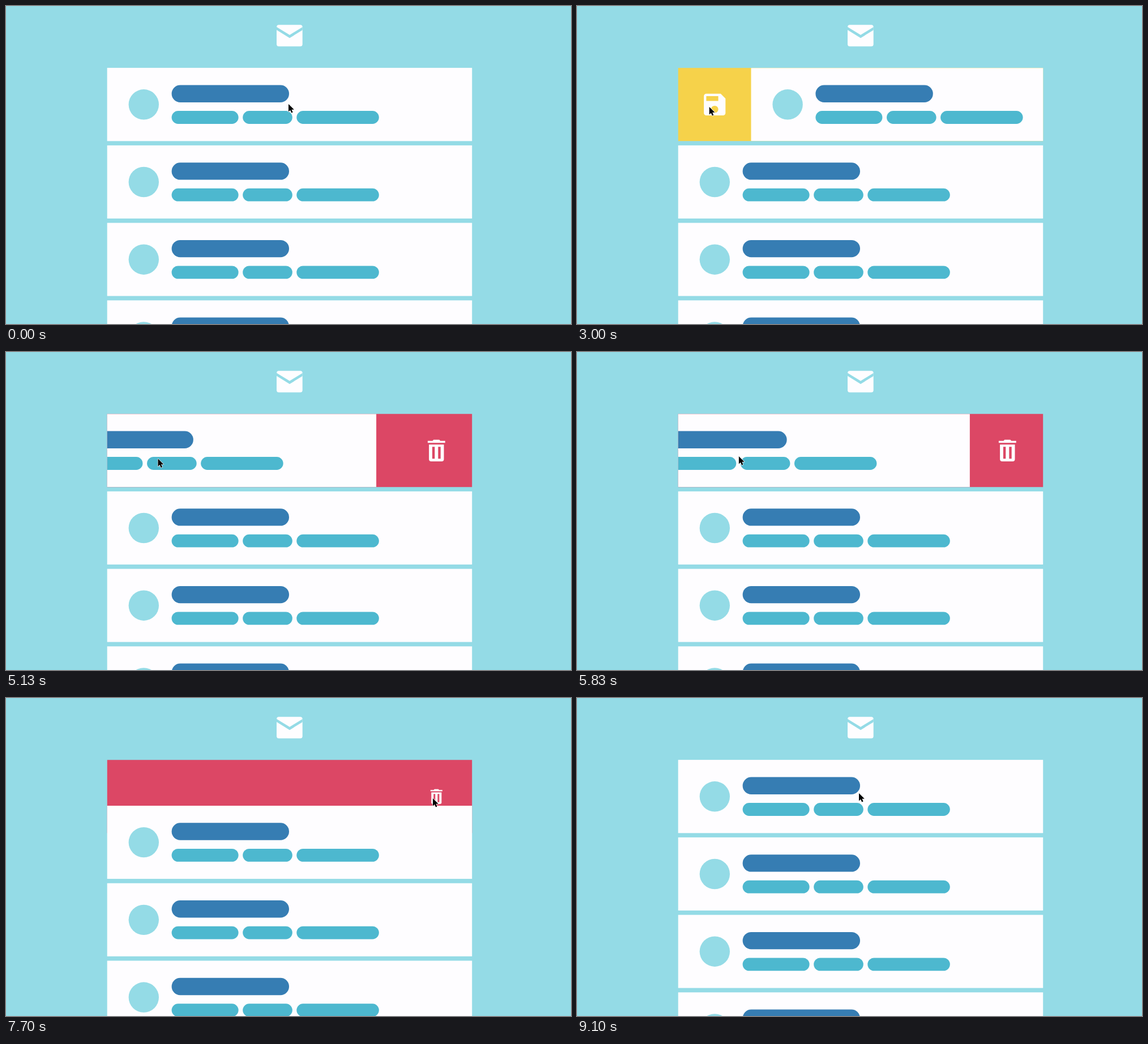
These frames come from a looping animation (998 by 561 pixels, 9730 ms). An HTML page:

```html
<!DOCTYPE html>
<html lang="en">
<head>
<meta charset="utf-8">
<title>Swipe actions</title>
<style>
  html, body { margin: 0; width: 100%; height: 100%; overflow: hidden; background: #94dbe6; }
  svg { display: block; width: 998px; height: 561px; }
  .paper { fill: #fefdff; }
  .sky { fill: #94dbe6; }
  .title { fill: #367db3; }
  .chip { fill: #4db8cf; }
  .save { fill: #f6d24a; }
  .trash { fill: #dc4765; }
</style>
</head>
<body>
<svg viewBox="0 0 998 561" xmlns="http://www.w3.org/2000/svg">
  <defs>
    <clipPath id="frame"><rect x="178.7" y="109.2" width="644.5" height="129"/></clipPath>
    <clipPath id="envelope"><rect x="478" y="33.2" width="45.7" height="38" rx="4"/></clipPath>
    <g id="row">
      <rect class="paper" x="178.7" y="109.2" width="644.5" height="129"/>
      <circle class="sky" cx="243.3" cy="173.8" r="26.7"/>
      <rect class="title" x="292.6" y="139.5" width="207.4" height="30.4" rx="15.2"/>
      <g class="chip">
        <rect x="292.6" y="185.1" width="118" height="22.8" rx="11.4"/>
        <rect x="418.2" y="185.1" width="87.6" height="22.8" rx="11.4"/>
        <rect x="513.3" y="185.1" width="145.5" height="22.8" rx="11.4"/>
      </g>
    </g>
  </defs>
  <rect class="sky" width="998" height="561"/>
  <g clip-path="url(#envelope)">
    <rect class="paper" x="478" y="33" width="46" height="39"/>
    <path d="M474 37.2L501 53.7L528 37.2" fill="none" stroke="#94dbe6" stroke-width="4.6"/>
  </g>
  <g clip-path="url(#frame)">
    <rect id="back" x="170" y="100" width="662" height="147"/>
    <path id="disk" class="paper" transform="translate(243.2 173.8) scale(2.12) translate(-12 -12)"
      d="M17 3H5c-1.11 0-2 .9-2 2v14c0 1.1.89 2 2 2h14c1.1 0 2-.9 2-2V7l-4-4zm-5 16c-1.66 0-3-1.34-3-3s1.34-3 3-3 3 1.34 3 3-1.34 3-3 3zm3-10H5V5h10v4z"/>
    <g id="bin">
      <path class="paper" d="M-5-19H5L7-17H15.4V-13.5H-15.4V-17H-7Z"/>
      <path class="paper" fill-rule="evenodd"
        d="M-13.2-10.5H13.2V15.2Q13.2 19.2 9.2 19.2H-9.2Q-13.2 19.2-13.2 15.2ZM-7.4-6.5V14.4H-3V-6.5ZM3-6.5V14.4H7.4V-6.5Z"/>
    </g>
    <use id="top" href="#row"/>
  </g>
  <g id="rest"></g>
  <path id="cursor" d="M0 0V13.6L3.1 10.7L5.2 15.6L7.6 14.6L5.5 9.8H9.8Z"
    fill="#000" stroke="#fff" stroke-width="1.3" stroke-linejoin="round" paint-order="stroke"/>
</svg>
<script>
const LOOP = 9730, PITCH = 136.7, OPEN = 128.8, WIDTH = 645, GRAB = 499;
const $ = id => document.getElementById(id);

// Pointer track: time, x, y
const TRACK = [
  [0, 499, 173], [770, 499, 173], [1120, 877, 203], [1470, 877, 203],
  [1770, 806, 200], [2550, 238, 178], [3720, 231, 178], [4100, 499, 175],
  [4670, 499, 175], [5450, 136, 196], [5580, 136, 195], [5670, 151, 192],
  [5830, 285, 184], [6400, 789, 180], [6630, 781, 177], [7300, 768, 175],
  [7700, 754, 177], [8630, 648, 174], [9100, 498, 168], [LOOP, 498, 168]
];

for (let i = 1; i < 5; i++) {
  const row = document.createElementNS("http://www.w3.org/2000/svg", "use");
  row.setAttribute("href", "#row");
  row.setAttribute("y", i * PITCH);
  $("rest").append(row);
}

const clamp = v => Math.min(1, Math.max(0, v));
const mix = (a, b, p) => a + (b - a) * p;

// The CSS "ease" curve, solved by bisection
function ease(x) {
  if (x <= 0 || x >= 1) return clamp(x);
  let lo = 0, hi = 1, s;
  for (let i = 0; i < 20; i++) {
    s = (lo + hi) / 2;
    const at = 0.75 * s * (1 - s) + s ** 3;
    if (at < x) lo = s; else hi = s;
  }
  return 0.3 * s * (1 - s) ** 2 + 3 * s * s * (1 - s) + s ** 3;
}
const phase = (t, start, length) => ease((t - start) / length);

const rise = (i, k) => (TRACK[i + 1][k] - TRACK[i][k]) / (TRACK[i + 1][0] - TRACK[i][0]);
function slope(i, k) {
  if (i === 0 || i === TRACK.length - 1) return 0;
  const a = rise(i - 1, k), b = rise(i, k);
  return a * b > 0 ? 2 * a * b / (a + b) : 0;
}

// Monotone cubic through the track
function pointer(t) {
  let i = 0;
  while (i < TRACK.length - 2 && t >= TRACK[i + 1][0]) i++;
  const h = TRACK[i + 1][0] - TRACK[i][0], u = (t - TRACK[i][0]) / h;
  return [1, 2].map(k =>
    mix(TRACK[i][k], TRACK[i + 1][k], u * u * (3 - 2 * u)) +
    h * u * (1 - u) * ((1 - u) * slope(i, k) - u * slope(i + 1, k)));
}

// Follows the pointer, with resistance past the open position
function drag(t) {
  const d = pointer(t)[0] - GRAB, size = Math.abs(d);
  return Math.sign(d) * (size > OPEN ? OPEN + 4 * Math.sqrt(size - OPEN) : size);
}

function offset(t) {
  if (t < 770) return 0;
  if (t < 1120) return drag(t);
  if (t < 3150) return mix(drag(1120), OPEN, phase(t, 1120, 340));
  if (t < 4670) return mix(OPEN, 0, phase(t, 3150, 350));
  if (t < 5525) return drag(t);
  if (t < 7276) return mix(drag(5525), -OPEN, phase(t, 5525, 350));
  if (t < 7926) return mix(-OPEN, -WIDTH, phase(t, 7276, 350));
  return 0;
}

function draw(t) {
  const x = offset(t), saving = x > 0;
  const fold = t < 7926 ? phase(t, 7626, 300) : 0;
  const [px, py] = pointer(t);
  $("back").setAttribute("class", x === 0 ? "paper" : saving ? "save" : "trash");
  $("disk").style.display = saving ? "" : "none";
  $("bin").style.display = x < 0 ? "" : "none";
  $("bin").setAttribute("transform", `translate(760.3 173.8) scale(${1 - 0.77 * fold})`);
  $("top").setAttribute("transform", `translate(${x} 0)`);
  $("rest").setAttribute("transform", `translate(0 ${-PITCH * fold})`);
  $("cursor").setAttribute("transform", `translate(${px} ${py})`);
}

const begin = performance.now();
function tick() {
  draw((performance.now() - begin) % LOOP);
  requestAnimationFrame(tick);
}
tick();
</script>
</body>
</html>
```
